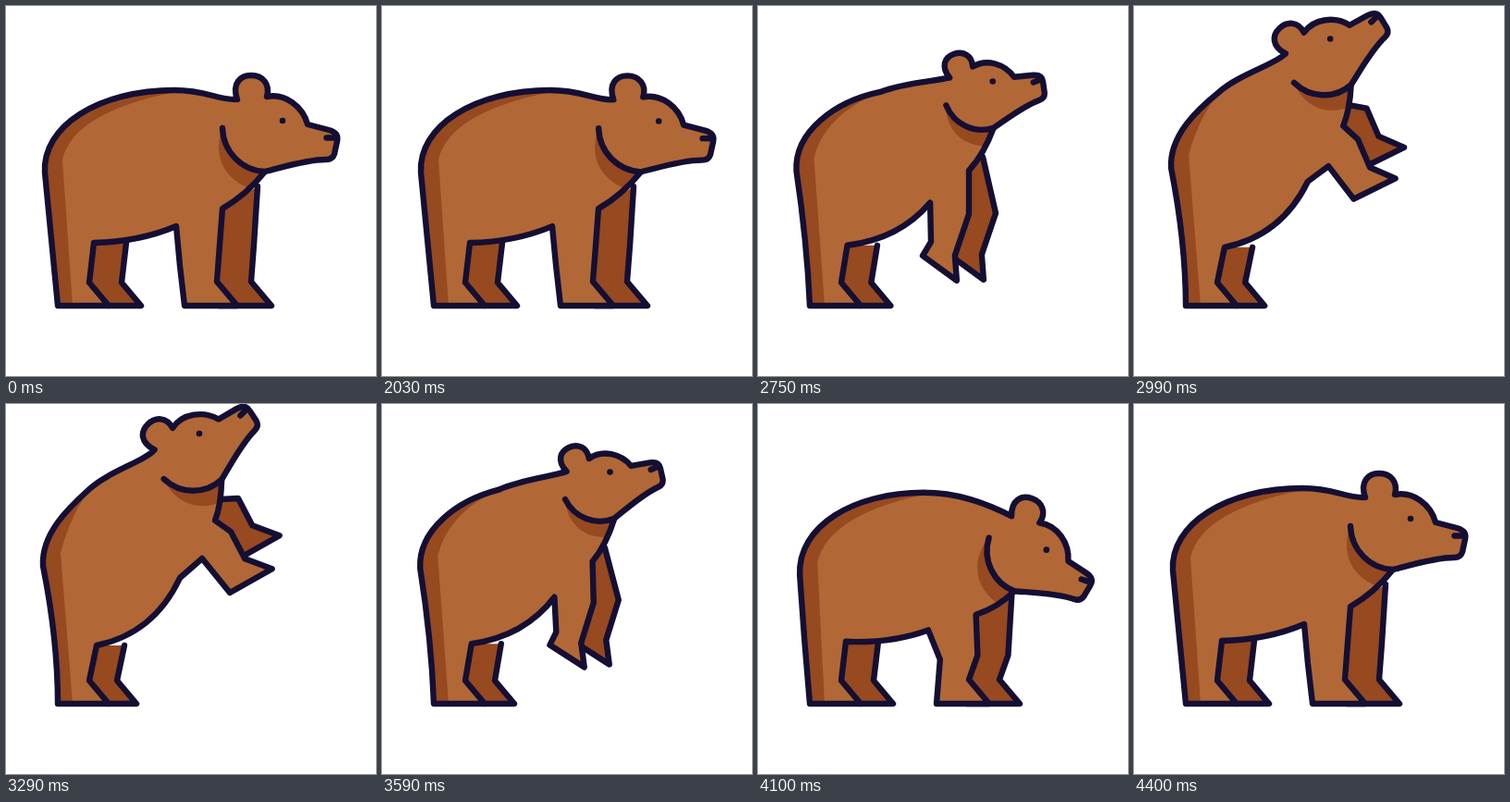
Write an HTML page with a canvas that moves like this. It is 400 px wide and 400 px high and loops after 4.43 s.

```html
<!DOCTYPE html>
<html lang="en">
<head>
<meta charset="utf-8">
<title>Bear</title>
<style>
  html, body { margin: 0; width: 100%; height: 100%; overflow: hidden; background: #fff; }
  canvas { display: block; width: 400px; height: 400px; }
</style>
</head>
<body>
<canvas id="stage" width="400" height="400"></canvas>
<script>
const ctx = document.getElementById('stage').getContext('2d');
const INK = '#140f33', FUR = '#b16836', SHADE = '#974920';
const LOOP = 4430, START = 2030, STEP = 30, GROUND = 324;
const HIND_TOE = [111, GROUND], HIND_ANKLE = [90, 299];

// Position, then the matrix terms of a turn and scale, so that turned parts blend linearly.
function turned(x, y, degrees, scale) {
  const angle = degrees * Math.PI / 180;
  return [x, y, scale * Math.cos(angle), scale * Math.sin(angle)];
}

const rest = {
  head: turned(299, 124, 0, 1),
  nape: [228, 102, 218, 91], top: [182, 91],
  rumpArc: [100, 91, 39, 130], rump: [42, 180], hock: [49, 252],
  hip: [95, 256], hindGap: [35, 0], belly: [144, 255], groin: [184, 238],
  chest: [234, 219], knee: [231, 258], elbow: [188, 281],
  paw: turned(193, GROUND, 0, 1), farTop: [272, 195], farGap: [37, 0]
};
const crouch = {
  head: turned(315, 166, 23.5, 0.98),
  nape: [250, 108, 215, 97], top: [178, 97],
  rumpArc: [105, 97, 43, 132], rump: [46, 187], hock: [50, 255],
  hip: [95, 257], hindGap: [35, 0], belly: [144, 260], groin: [184, 246],
  chest: [236, 230], knee: [239, 275], elbow: [199, 275],
  paw: turned(193, GROUND, 0, 1), farTop: [275, 208], farGap: [32, 0]
};
const upright = {
  head: turned(209, 32, -45, 0.95),
  nape: [150, 62, 110, 73], top: [89, 93],
  rumpArc: [68, 112, 38, 140], rump: [40, 175], hock: [56, 255],
  hip: [98, 261], hindGap: [30, 0], belly: [160, 248], groin: [188, 188],
  chest: [226, 126], knee: [243, 138], elbow: [212, 167],
  paw: turned(242, 204, -29.5, 0.92), farTop: [232, 103], farGap: [8, -36]
};

const mapParts = fn => Object.fromEntries(Object.keys(rest).map(part =>
  [part, rest[part].map((_, i) => fn(part, i))]));
const mix = (p, q, w) => mapParts((part, i) => p[part][i] + (q[part][i] - p[part][i]) * w);

// Halfway up, with the front paws hanging.
const lift = {
  ...mix(mix(rest, crouch, 0.32), upright, 0.53),
  chest: [228, 178], knee: [228, 225], elbow: [187, 255],
  paw: turned(178, 270, 36, 0.8), farTop: [243, 163], farGap: [29, -1]
};

const keys = [
  [2000, rest], [2480, crouch], [2750, lift], [2990, mix(lift, upright, 0.93)],
  [3140, upright], [3290, upright], [3430, mix(lift, upright, 0.88)],
  [3620, lift], [3830, mix(rest, crouch, 0.45)], [3980, crouch], [4400, rest]
];

// Monotone cubic interpolation: smooth, resting at every turning point.
function poseAt(time) {
  if (time <= keys[0][0] || time >= keys[keys.length - 1][0]) return rest;
  const k = keys.findIndex(key => key[0] > time) - 1;
  const span = keys[k + 1][0] - keys[k][0];
  const u = (time - keys[k][0]) / span, v = 1 - u;
  return mapParts((part, i) => {
    const value = n => keys[n][1][part][i];
    const rate = n => keys[n + 1]
      ? (value(n + 1) - value(n)) / (keys[n + 1][0] - keys[n][0]) : 0;
    const slope = n => {
      if (n === 0) return 0;
      const a = rate(n - 1), b = rate(n);
      return a * b > 0 ? 2 * a * b / (a + b) : 0;
    };
    return v * v * (1 + 2 * u) * value(k) + u * u * (3 - 2 * u) * value(k + 1)
      + u * v * span * (v * slope(k) - u * slope(k + 1));
  });
}

// Head shapes around the eye.
const headShape = new Path2D('M-49 -23C-55 -40 -46 -49 -34 -49C-22 -49 -13 -40 -17 -26' +
  'C3 -30 22 -15 27 4L50 10Q61 13 59 22L56 36Q54 42 47 42C26 42 1 50 -19 55' +
  'C-44 54 -64 34 -65 8');
const chinShape = new Path2D('M-65 8C-75 33 -67 63 -33 74L-9 66L-19 36Z');
const noseShape = new Path2D('M47.5 18.5H57');

const add = ([x, y], [dx, dy]) => [x + dx, y + dy];
const between = ([x, y], [x2, y2], w) => [x + (x2 - x) * w, y + (y2 - y) * w];
const place = ([x, y, a, b], px, py) => [x + px * a - py * b, y + px * b + py * a];

function fill(path, color) {
  ctx.fillStyle = color;
  ctx.fill(path);
}

function polyline(points, path = new Path2D()) {
  points.forEach(point => path.lineTo(...point));
  return path;
}

function drawFarLeg(outline, inner) {
  fill(polyline([...outline, ...inner]), SHADE);
  ctx.stroke(polyline(outline));
}

function draw(pose) {
  const { head, nape, top, rumpArc, rump, hock, hip, hindGap, belly, groin,
    chest, knee, elbow, paw, farTop, farGap } = pose;
  const [eyeX, eyeY, a, b] = head;
  const heel = place(paw, 0, 0), toe = place(paw, 57, 0), ankle = place(paw, 35, -26);
  const throat = place(head, -19, 55);
  const onHead = shape => {
    const path = new Path2D();
    path.addPath(shape, new DOMMatrix([a, b, -b, a, eyeX, eyeY]));
    return path;
  };

  ctx.fillStyle = '#fff';
  ctx.fillRect(0, 0, 400, 400);
  ctx.strokeStyle = INK;
  ctx.lineWidth = 6.4;
  ctx.lineCap = ctx.lineJoin = 'round';

  // The far legs repeat the near ones at an offset.
  const farHind = [hip, HIND_ANKLE, HIND_TOE].map(point => add(point, hindGap));
  drawFarLeg([...farHind, HIND_TOE], [HIND_ANKLE, hip]);
  const farFront = [knee, ankle, toe, heel].map(point => add(point, farGap));
  drawFarLeg([farTop, ...farFront], [chest]);

  const body = new Path2D();
  body.moveTo(...place(head, -49, -23));
  body.bezierCurveTo(...nape, ...top);
  body.bezierCurveTo(...rumpArc, ...rump);
  body.quadraticCurveTo(...hock, 56, GROUND);
  polyline([HIND_TOE, HIND_ANKLE, hip], body);
  body.quadraticCurveTo(...belly, ...groin);
  polyline([elbow, heel, toe, ankle, knee, chest], body);
  body.quadraticCurveTo(...add(between(chest, throat, 0.5), [3, 5]), ...throat);
  fill(body, FUR);

  ctx.save();
  ctx.clip(body);
  const rumpShade = new Path2D();
  rumpShade.moveTo(...between(top, nape.slice(2), 0.3));
  rumpShade.quadraticCurveTo(rump[0] + 31, top[1] + 22, ...add(rump, [19, -14]));
  polyline([[72, GROUND], [20, GROUND], [20, 60]], rumpShade);
  fill(rumpShade, SHADE);
  fill(onHead(chinShape), SHADE);
  ctx.restore();
  ctx.stroke(body);

  const face = onHead(headShape);
  fill(face, FUR);
  ctx.stroke(face);
  ctx.stroke(onHead(noseShape));
  const eye = new Path2D();
  eye.arc(eyeX, eyeY, 3.3, 0, Math.PI * 2);
  fill(eye, INK);
}

function tick() {
  const time = performance.now() % LOOP;
  draw(time < START ? rest : poseAt(time - (time - START) % STEP));
  requestAnimationFrame(tick);
}
tick();
</script>
</body>
</html>
```
